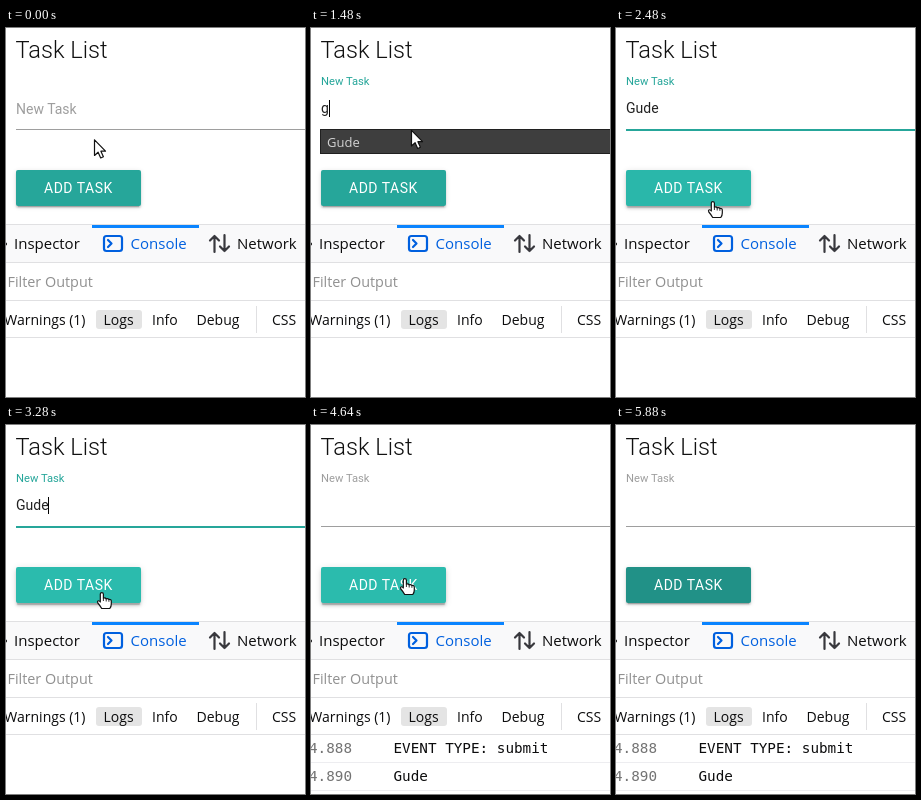
An HTML page that plays this animation: 299 by 369 pixels, repeating every 5920 ms.

```html
<!DOCTYPE html>
<html lang="en">
<head>
<meta charset="utf-8">
<title>Task List</title>
<style>
  html, body { margin: 0; width: 100%; height: 100%; overflow: hidden; background: #fff; }
  #button { position: absolute; left: 10px; top: 142px; width: 125px; height: 36px; border-radius: 2px; }
  svg { position: absolute; left: 0; top: 0; display: block; }
  text { white-space: pre; }
  .page { font: 14px Roboto, sans-serif; fill: #212121; }
  .title { font-size: 23.6px; font-weight: 300; fill: #111; }
  .tools { font: 14px "Open Sans", sans-serif; fill: #0c0c0d; }
  .tabs { font-size: 15px; font-weight: 500; }
  .log { font: 14.3px "DejaVu Sans Mono", monospace; fill: #0c0c0d; }
  .cursor { fill: #fff; stroke: #111; stroke-width: 1.2; stroke-linejoin: round; }
</style>
</head>
<body>
<div id="button"></div>
<svg width="299" height="369" viewBox="0 0 299 369">
  <g class="page">
    <text x="9.5" y="30" class="title">Task List</text>
    <text id="label" x="10">New Task</text>
    <text id="value" x="10" y="85"></text>
    <rect id="caret" y="72" width="1" height="17" fill="#000"/>
    <rect id="line" x="10" y="101" width="289"/>
    <text x="38" y="165" fill="#fff" letter-spacing=".5">ADD TASK</text>
  </g>

  <g id="dropdown">
    <rect x="9.5" y="101.5" width="300" height="24" fill="#3e3e3e" stroke="#202020"/>
    <text x="16" y="119" class="tools" style="font-size:13px;fill:#d3d3d3">Gude</text>
  </g>

  <g class="tools">
    <path d="M0 196h299v39H0z" fill="#f9f9fa"/>
    <path d="M0 196.5H299M0 234.5H299M0 272.5H299M0 309.5H299M250.5 278V305" stroke="#e0e0e2"/>
    <path d="M86 197h107v3H86z" fill="#0a84ff"/>
    <g class="tabs">
      <circle cx="-.5" cy="216" r="1.5"/>
      <text x="8" y="221">Inspector</text>
      <text x="124.5" y="221" fill="#0060df">Console</text>
      <text x="231" y="221">Network</text>
    </g>
    <g fill="none" stroke-width="2.2" stroke-linecap="round" stroke-linejoin="round">
      <g stroke="#0060df">
        <rect x="98" y="208" width="18" height="15" rx="2.5"/>
        <path d="M102 212l3.5 3.5-3.5 3.5"/>
      </g>
      <path d="M208.5 224V208M204 212.5l4.5-4.5 4.5 4.5M218.5 207V223M214 218.5l4.5 4.5 4.5-4.5" stroke="#38383d"/>
    </g>
    <text x="1.5" y="259" fill="#909090" style="font-size:14.4px">Filter Output</text>
    <rect x="90" y="282" width="46" height="19" rx="3" fill="#e4e4e4"/>
    <text x="79.5" y="297" text-anchor="end">Warnings (1)</text>
    <text x="97.5" y="297">Logs</text>
    <text x="146" y="297">Info</text>
    <text x="190.5" y="297">Debug</text>
    <text x="266" y="297">CSS</text>
  </g>

  <g id="logs" class="log">
    <path d="M0 337.5H299M0 365.5H299" stroke="#ededf0"/>
    <g fill="#737373"><text x="-2" y="328">4.888</text><text x="-2" y="356">4.890</text></g>
    <text x="82.5" y="328">EVENT TYPE: submit</text>
    <text x="82.5" y="356">Gude</text>
  </g>

  <g id="cursor" class="cursor">
    <path id="arrow" d="M.5 .8V16.5L4.1 13.2L6.7 19L9.4 17.8L6.9 12.2H11.5Z"/>
    <path id="beam" d="M-4-8h3l1 1 1-1h3v2h-3V6h3v2h-3l-1-1-1 1h-3V6h3V-6h-3z"
      fill="#111" stroke="#fff" paint-order="stroke"/>
    <g id="hand">
      <path d="M-1.7 10V2Q-1.7 .6 -.2 .6T1.4 2V6.2Q3.2 5.3 4.2 6.8Q6 6 6.9 7.5Q9.3 7.2 9.3 9.2V12Q9.3 14.500 7.800 16.500H-.3Q-2 13.500-4.200 11Q-5 9.500-3.800 8.800Q-2.700 8.500-1.700 10Z"/>
      <path d="M1.4 6.2V9M4.2 6.8V9.5M6.9 7.5V9.8" stroke-width=".9"/>
    </g>
  </g>
</svg>
<script>
const LOOP = 5920, STEP = 40;
const GREY = [158, 158, 158], TEAL = [38, 166, 154], HOVER = [43, 187, 173], FOCUS = [29, 125, 116];
// Pointer hot spot: time, x, y
const PATH = [
  [0, 88, 111], [20, 88, 111], [280, 104.5, 99.5], [500, 104.5, 99.5], [600, 104.5, 94],
  [1420, 104.5, 94], [1480, 100, 101.5], [1640, 100, 111.5], [2220, 100, 111.5],
  [2400, 97, 173], [2780, 97, 173], [2880, 96, 167], [4610, 96, 167],
  [4640, 94, 153], [4680, 96, 120], [4840, 108, -25], [LOOP, 108, -25]
];

const el = id => document.getElementById(id);
const set = (id, attrs) => { for (const k in attrs) el(id).setAttribute(k, attrs[k]); };
const show = (id, on) => { el(id).style.display = on ? '' : 'none'; };
const mix = (a, b, p) => a.map((v, i) => v + (b[i] - v) * p);
const rgb = c => `rgb(${c.map(Math.round)})`;
const within = (t, a, b) => t >= a && t < b;

function ramp(t, start, length) {
  const p = Math.min(1, Math.max(0, (t - start) / length));
  return 1 - (1 - p) ** 1.7;
}

function pointerAt(t) {
  const i = PATH.findIndex(k => k[0] > t);
  const [a, b] = [PATH[i - 1], PATH[i]];
  return mix(a, b, (t - a[0]) / (b[0] - a[0])).slice(1);
}

function drawField(t) {
  const raised = ramp(t, 910, 200);
  const labelFocus = raised - ramp(t, 3470, 200);
  const lineFocus = ramp(t, 910, 300) - ramp(t, 3470, 300);
  el('label').style.fontSize = 14 - 2.8 * raised + 'px';
  set('label', { y: 86 - 29 * raised, fill: rgb(mix(GREY, TEAL, labelFocus)) });
  set('line', { height: 1 + lineFocus, fill: rgb(mix(GREY, TEAL, lineFocus)) });

  const value = within(t, 1440, 1800) ? 'g' : within(t, 1800, 3600) ? 'Gude' : '';
  el('value').textContent = value;
  set('caret', { x: { '': 10, g: 18, Gude: 42 }[value] });
  show('caret', within(t, 920, 2080) || within(t, 3280, 3480));
  show('dropdown', within(t, 1000, 1800));
}

function drawButton(t) {
  const enter = ramp(t, 2290, 300), leave = ramp(t, 4660, 300), h = enter - leave;
  const style = el('button').style;
  style.background = rgb(mix(mix(mix(TEAL, HOVER, enter), FOCUS, leave), TEAL, ramp(t, 5780, 300)));
  style.boxShadow = `0 ${2 + h}px ${2 + h}px rgba(0,0,0,.14),
    0 1px ${5 + 2 * h}px rgba(0,0,0,.12),
    0 3px 1px ${h - 2}px rgba(0,0,0,.2)`;
}

function drawCursor(t) {
  const [x, y] = pointerAt(t);
  const beam = within(y, 60, 103) && !within(t, 1440, 1840);
  const hand = within(y, 142, 178);
  set('cursor', { transform: `translate(${x} ${y})` });
  show('beam', beam);
  show('hand', hand);
  show('arrow', !beam && !hand);
}

function frame() {
  const t = Math.floor(performance.now() % LOOP / STEP) * STEP;
  drawField(t);
  drawButton(t);
  drawCursor(t);
  show('logs', t >= 3680);
  requestAnimationFrame(frame);
}
frame();
</script>
</body>
</html>
```
